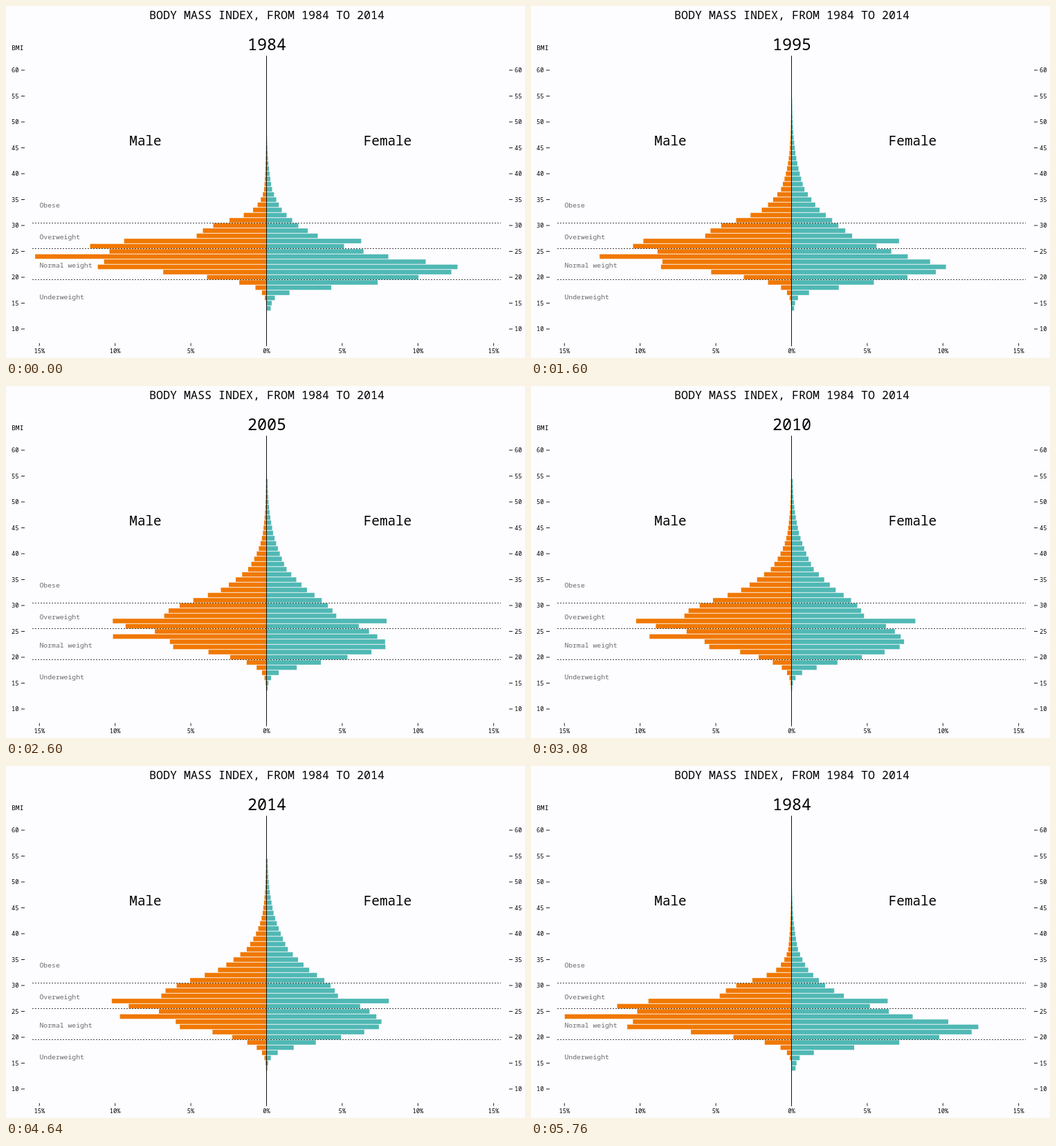
These frames come from a looping animation (750x510 px, 5800 ms). An HTML page:

```html
<!DOCTYPE html>
<html lang="en">
<head>
<meta charset="utf-8">
<title>Body mass index</title>
<style>
  html, body { margin: 0; width: 100%; height: 100%; overflow: hidden; background: #fdfcfe; }
  svg { display: block; width: 750px; height: 510px; }
  text { font-family: "Noto Sans Mono", "DejaVu Sans Mono", monospace; font-weight: 500; }
</style>
</head>
<body>
<svg id="chart" viewBox="0 0 750 510"></svg>
<script>
const LOOP = 5800, STEP = 40;
const RUN_START = 500, YEAR_MS = 100, YEARS = 30;
const SWING_START = 4514, SWING_MS = 450;
const MID = 376.5, PER_CENT = 21.88, ROW = 7.5;
const LOWEST = 14, HIGHEST = 54;

const svg = document.getElementById('chart');
const rowY = bmi => 93 + (60 - bmi) * ROW;
const clamp = (v, lo, hi) => Math.min(hi, Math.max(lo, v));
const mix = (a, b, u) => a + (b - a) * u;
const smooth = u => u * u * (3 - 2 * u);
const cubicInOut = u => u < .5 ? 4 * u ** 3 : 1 - 4 * (1 - u) ** 3;

function add(tag, attrs, text) {
  const el = document.createElementNS('http://www.w3.org/2000/svg', tag);
  for (const name in attrs) el.setAttribute(name, attrs[name]);
  if (text !== undefined) el.textContent = text;
  svg.appendChild(el);
  return el;
}
const label = (text, x, y, size, anchor = 'middle', fill = '#000') =>
  add('text', { x, y, 'font-size': size, 'text-anchor': anchor, fill }, text);
const line = (x1, y1, x2, y2, extra) =>
  add('line', { x1, y1, x2, y2, stroke: '#222', 'stroke-width': 1, ...extra });

// A smooth curve through bar lengths at a few BMI values, bent on a log scale.
const KNOTS = [14, 16, 18, 20, 22, 24, 26, 28, 30, 33, 37, 44, 54];

function curve(...lengths) {
  const logs = lengths.map(Math.log);
  const at = i => logs[clamp(i, 0, logs.length - 1)];
  return bmi => {
    let i = 0;
    while (i < KNOTS.length - 2 && bmi >= KNOTS[i + 1]) i++;
    const u = (bmi - KNOTS[i]) / (KNOTS[i + 1] - KNOTS[i]);
    const [a, b, c, d] = [at(i - 1), at(i), at(i + 1), at(i + 2)];
    return Math.exp(b + u / 2 * (c - a + u * (2 * a - 5 * b + 4 * c - d + u * (3 * (b - c) + d - a))));
  };
}

// "heaps" are BMI values that people report more often than the curve predicts.
const groups = [
  { fill: '#f07800', sign: -1,
    first: curve(.2, 2.5, 16, 86, 212, 229, 204, 101, 77, 19.5, 3.5, .9, .1),
    last: curve(.8, 3, 14, 46, 99, 137, 155, 157, 135, 75, 31, 6, .8),
    heaps: { 22: 1.15, 24: 1.46, 26: 1.25, 27: 1.42 } },
  { fill: '#50b8b4', sign: 1,
    first: curve(6, 12, 93.5, 219.5, 276, 176, 112, 74, 46, 22, 8, 1.5, .1),
    last: curve(.7, 5.5, 34, 97, 151.5, 157, 137.5, 106, 97, 65.5, 33, 11, 1.8),
    heaps: { 27: 1.5 } }
];

const bars = [];
for (const { fill, sign, first, last, heaps } of groups) {
  for (let bmi = LOWEST; bmi <= HIGHEST; bmi++) {
    const heap = heaps[bmi] || 1;
    const el = add('rect', { x: MID, y: rowY(bmi) - 3.3, height: 6.6, fill });
    bars.push({ el, sign, from: first(bmi) * heap, to: last(bmi) * heap });
  }
}

for (const limit of [19.5, 25.5, 30.5]) {
  const y = Math.floor(rowY(limit)) + .5;
  line(38, y, 715, y, { 'stroke-dasharray': '2 2', stroke: '#444' });
}
line(MID, 72, MID, 493, { stroke: '#111' });

for (let bmi = 10; bmi <= 60; bmi += 5) {
  const y = rowY(bmi);
  label(bmi, 8, y + 3.3, 8.8, 'start');
  label(bmi, 745.5, y + 3.3, 8.8, 'end');
  line(22, y, 27, y);
  line(727, y, 732, y);
}
for (let p = -15; p <= 15; p += 5) {
  const x = MID + p * PER_CENT;
  line(x, 488.5, x, 492.5);
  label(Math.abs(p) + '%', x, 503, 8.8);
}
label('BODY MASS INDEX, FROM 1984 TO 2014', 377, 19, 16.67);
label('BMI', 8, 63.5, 9.75, 'start');
label('Male', 201.5, 202, 19.3);
label('Female', 551.5, 202, 19.3);
for (const [name, y] of [['Obese', 292], ['Overweight', 338], ['Normal weight', 379], ['Underweight', 425]])
  label(name, 48.5, y, 9.75, 'start', '#6a6a6a');
const yearLabel = label('1984', 377, 64, 23.4);

// Progress from the first year (0) to the last (1), with the year to print.
function stateAt(t) {
  if (t >= SWING_START) {
    const p = (t - SWING_START) / SWING_MS, leg = Math.floor(p), e = cubicInOut(p - leg);
    const progress = leg % 2 ? e : 1 - e;
    return { progress, year: progress > .5 ? 2014 : 1984 };
  }
  const years = clamp((t - RUN_START) / YEAR_MS, 0, YEARS), f = years / YEARS;
  return {
    progress: (Math.sin(f * Math.PI / 2) + smooth(f)) / 2,
    year: 1984 + Math.ceil(years)
  };
}

function draw(t) {
  const { progress, year } = stateAt(t);
  for (const { el, sign, from, to } of bars) {
    const width = mix(from, to, progress);
    el.setAttribute('width', width.toFixed(2));
    if (sign < 0) el.setAttribute('x', (MID - width).toFixed(2));
  }
  yearLabel.textContent = year;
}

const start = performance.now();
function tick() {
  const t = (performance.now() - start) % LOOP;
  draw(Math.floor(t / STEP) * STEP);
  requestAnimationFrame(tick);
}
draw(0);
requestAnimationFrame(tick);
</script>
</body>
</html>
```
